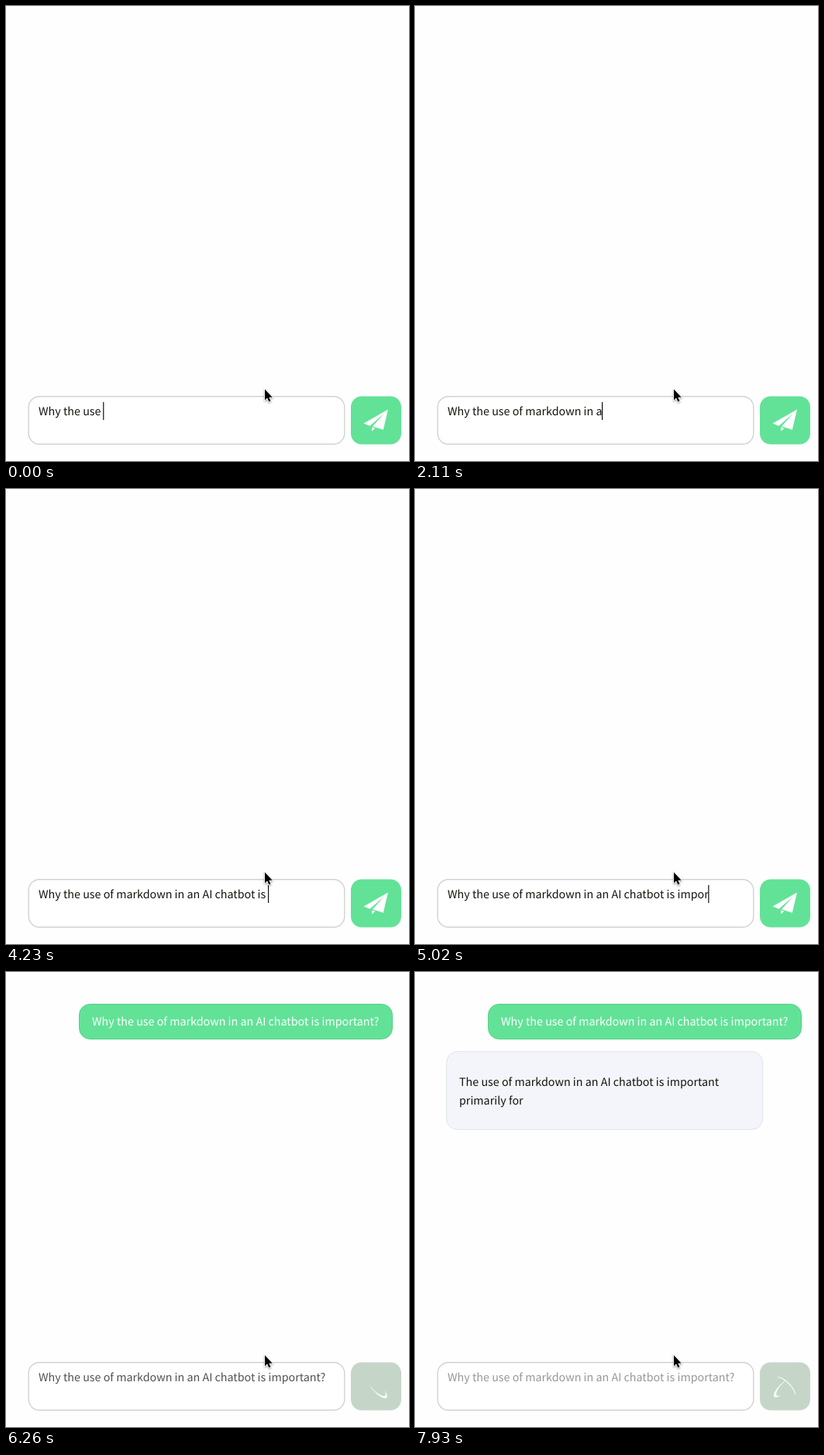
Animation of 520 by 587 pixels, one loop 8000 ms. Source, as an HTML page:

```html
<!DOCTYPE html>
<html lang="en">
<head>
<meta charset="utf-8">
<style>
  html, body { margin: 0; width: 100%; height: 100%; overflow: hidden; background: #fefefe; }
  svg { position: absolute; left: 0; top: 0; }
  text {
    font: 14.32px "Noto Sans CJK SC", "Noto Sans CJK JP", "Noto Sans CJK", "Open Sans", sans-serif;
    text-rendering: geometricPrecision;
    white-space: pre;
    fill: #14150c;
  }
  #spin {
    position: absolute; left: 461.5px; top: 518.5px; width: 32px; height: 32px;
    perspective: 1000px; transform: rotateZ(45deg);
  }
  #spin i { position: absolute; width: 32px; height: 32px; border-radius: 50%; }
  #ringA { transform: rotateX(70deg); }
  #ringB { transform: rotateY(70deg); }
</style>
</head>
<body>
<svg width="520" height="587" viewBox="0 0 520 587">
  <g id="question">
    <rect x="94.5" y="41.5" width="404" height="45" rx="14" fill="#62e297" stroke="#56cf88"/>
    <text x="111" y="69" style="fill:#fff">Why the use of markdown in an AI chatbot is important?</text>
  </g>
  <g id="answer">
    <rect id="bubble" x="40.7" y="102.7" rx="14" fill="#f4f5fa" stroke="#e0e4ea"/>
    <text id="line1" x="57" y="146.5"></text>
    <text id="line2" x="57" y="170.5"></text>
  </g>
  <rect x="29.2" y="503.7" width="407.6" height="61.6" rx="14" fill="#fff" stroke="#d0d3d2" stroke-width="1.4"/>
  <text id="input" x="42" y="528" xml:space="preserve"></text>
  <rect id="caret" y="511" width="1.2" height="23" fill="#111"/>
  <rect id="button" x="445" y="503.5" width="65" height="62" rx="14"/>
  <path id="plane" fill="#fff" d="M493 520.5 461.5 538.5 469.5 541.7 488 525.5 473 542.3 486.8 546.8ZM472 543.4V548.5L476.5 544.8Z"/>
  <path d="M334 494.5v14l3.1-2.9 2.2 5 2.2-1-2.2-4.8h4.4z" fill="#000" stroke="#fff" stroke-width="1.6"
    paint-order="stroke" style="filter:drop-shadow(0 1px 1px #0006)"/>
</svg>
<div id="spin"><i id="ringA"></i><i id="ringB"></i></div>
<script>
const LOOP = 8000, SENT = 6260, SPIN = 6180, REPLY = 7140, KEY_GAP = 85;
const $ = id => document.getElementById(id);
const clamp = (v, lo, hi) => Math.min(hi, Math.max(lo, v));
const show = (id, on) => { $(id).style.visibility = on ? "visible" : "hidden"; };

// Bursts of typing: start time, keys, gap between keys
const bursts = [
  [170, "of "], [520, "ma"], [790, "rkd"], [1140, "o"], [1320, "wn "], [1770, "i"],
  [1940, "n a"], [2290, "n ", 80], [2820, "A"], [2910, "I ", 0], [3180, "ch", 0],
  [3360, "at", 80], [3620, "b"], [3790, "ot is ", 88], [4410, "i"], [4580, "m"],
  [4850, "por"], [5200, "t"], [5380, "an", 80], [5640, "t"], [6000, "?"]
];
const words = "The use of markdown in an AI chatbot is important primarily for".split(" ");
const LINE_WORDS = 10;

function typed(t) {
  let s = "Why the use ";
  for (const [start, keys, gap = KEY_GAP] of bursts)
    [...keys].forEach((key, i) => { if (t >= start + i * gap) s += key; });
  return s;
}

// A shadow offset runs round a square and leaves a crescent beside the disc
function ring(id, ms) {
  const side = k => clamp(Math.abs((k + 8) % 8 - 4) - 2, -1, 1) * 3.2;
  const k = ms / 125 % 8;
  $(id).style.boxShadow = ms < 0 ? "none" : `${side(k)}px ${side(k - 2)}px #fff`;
}

function reply(t) {
  const step = Math.floor((t - REPLY) / 87.7);
  const count = clamp(Math.round(1 + step * 1.22), 0, words.length);
  const wrapped = count > LINE_WORDS;
  $("line1").textContent = words.slice(0, Math.min(count, LINE_WORDS)).join(" ");
  $("line2").textContent = words.slice(LINE_WORDS, count).join(" ");
  $("bubble").setAttribute("width", wrapped ? 408 : $("line1").getComputedTextLength() + 33);
  $("bubble").setAttribute("height", wrapped ? 100.5 : 76.5);
}

function draw(t) {
  const sent = t >= SENT;
  const input = $("input");
  input.textContent = typed(t);
  $("caret").setAttribute("x", 41.5 + input.getComputedTextLength());
  const fade = sent ? 1 - (1 - clamp((t - SPIN) / 300, 0, 1)) ** 2 : 0;
  input.style.opacity = 1 - 0.56 * fade;
  $("button").setAttribute("fill", sent ? "#c5d6c9" : "#62e297");
  show("caret", !sent);
  show("plane", !sent);
  show("question", sent);
  show("spin", sent);
  show("answer", t >= REPLY);
  ring("ringA", t - SPIN);
  ring("ringB", t - SPIN - 400);
  reply(t);
}

const began = performance.now();
function tick() {
  draw((performance.now() - began) % LOOP);
  requestAnimationFrame(tick);
}
tick();
</script>
</body>
</html>
```
